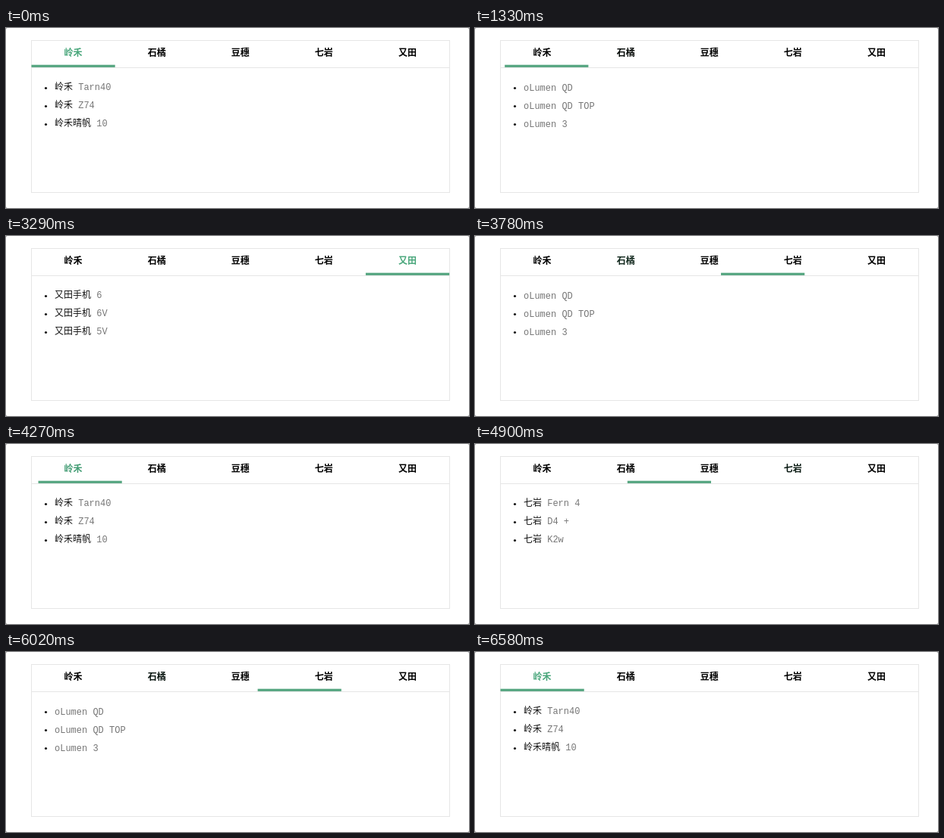
An HTML page that plays this animation: 610 px wide and 238 px high, repeating every 7.49 s.

```html
<!DOCTYPE html>
<html lang="zh-CN">
<head>
<meta charset="utf-8">
<title>Tabs</title>
<style>
  html, body { margin: 0; width: 100%; height: 100%; overflow: hidden; background: #999; }
  svg { display: block; width: 610px; height: 238px; background: #fff; border-radius: 2px; }
  text { font: 12px "Noto Sans CJK SC", "Noto Sans CJK", sans-serif; fill: #111; }
  .title { font-weight: 700; text-anchor: middle; }
  .latin { font-family: "Liberation Mono", monospace; fill: #777; }
  .frame { fill: none; stroke: #e6e6e6; }
  .bar { fill: #54a57f; }
</style>
</head>
<body>
<svg viewBox="0 0 610 238">
  <rect class="frame" x="33.5" y="16.5" width="551" height="201"/>
  <path class="frame" d="M34 52.5H584"/>
  <rect class="bar" y="48.7" width="110.2" height="3.2"/>
</svg>
<script>
const LOOP = 7490, TICK = 70, DURATION = 500;
const LEFT = 33.5, TAB_WIDTH = 110.1;
const GREEN = [74, 167, 124];

const tabs = [
  { title: '岭禾', items: [['岭禾', 'Tarn40'], ['岭禾', 'Z74'], ['岭禾晴帆', '10']] },
  { title: '石橘', items: [['', 'oLumen QD'], ['', 'oLumen QD TOP'], ['', 'oLumen 3']] },
  { title: '豆穗', items: [['豆穗', '7'], ['豆穗', 'KV 2'], ['豆穗', 'W4']] },
  { title: '七岩', items: [['七岩', 'Fern 4'], ['七岩', 'D4 +'], ['七岩', 'K2w']] },
  { title: '又田', items: [['又田手机', '6'], ['又田手机', '6V'], ['又田手机', '5V']] }
];

// [time in ms, selected tab]
const selections = [
  [1296, 1], [1702, 2], [2078, 3], [2782, 4],
  [3485, 3], [3590, 2], [3690, 1], [3912, 0],
  [4535, 1], [4690, 2], [4830, 3], [5100, 4],
  [5725, 3], [5830, 2], [5960, 1], [6088, 0]
];

const svg = document.querySelector('svg');
const bar = svg.querySelector('.bar');

function add(parent, name, attrs, text = '') {
  const node = document.createElementNS(svg.namespaceURI, name);
  for (const key in attrs) node.setAttribute(key, attrs[key]);
  node.textContent = text;
  return parent.appendChild(node);
}

const tabX = i => LEFT + i * TAB_WIDTH;

const titles = tabs.map((tab, i) =>
  add(svg, 'text', { class: 'title', x: tabX(i) + TAB_WIDTH / 2, y: 37 }, tab.title));

const lists = tabs.map(tab => {
  const group = add(svg, 'g', {});
  tab.items.forEach(([brand, model], row) => {
    const y = 82 + row * 24;
    add(group, 'circle', { cx: 52.5, cy: y - 2.5, r: 1.6, fill: '#111' });
    const line = add(group, 'text', { x: 64, y: brand ? y : y + 1 });
    if (brand) add(line, 'tspan', {}, brand);
    add(line, 'tspan', { class: 'latin' }, (brand ? ' ' : '') + model);
  });
  return group;
});

// CSS "ease": cubic-bezier(.25, .1, .25, 1)
function ease(p) {
  if (p >= 1) return 1;
  let low = 0, high = 1;
  for (let i = 0; i < 24; i++) {
    const mid = (low + high) / 2;
    if (0.75 * mid * (1 - mid) + mid ** 3 < p) low = mid; else high = mid;
  }
  const s = low, r = 1 - s;
  return 0.3 * s * r * r + 3 * s * s * r + s ** 3;
}

// Each selection starts from wherever the bar was when interrupted.
function stateAt(time) {
  let from = LEFT, start = -DURATION, active = 0;
  const progress = now => ease((now - start) / DURATION);
  const position = now => from + (tabX(active) - from) * progress(now);
  for (const [when, tab] of selections) {
    if (when > time) break;
    from = position(when);
    start = when;
    active = tab;
  }
  return { active, x: position(time), tint: progress(time) };
}

function draw(now) {
  const time = Math.floor((now % LOOP) / TICK) * TICK;
  const { active, x, tint } = stateAt(time);
  bar.setAttribute('x', x);
  titles.forEach((title, i) => {
    title.style.fill = i === active ? `rgb(${GREEN.map(c => Math.round(c * tint))})` : '#000';
  });
  lists.forEach((list, i) => {
    list.style.display = i === active ? '' : 'none';
  });
}

const began = performance.now();
function loop() {
  draw(performance.now() - began);
  requestAnimationFrame(loop);
}
loop();
</script>
</body>
</html>
```
